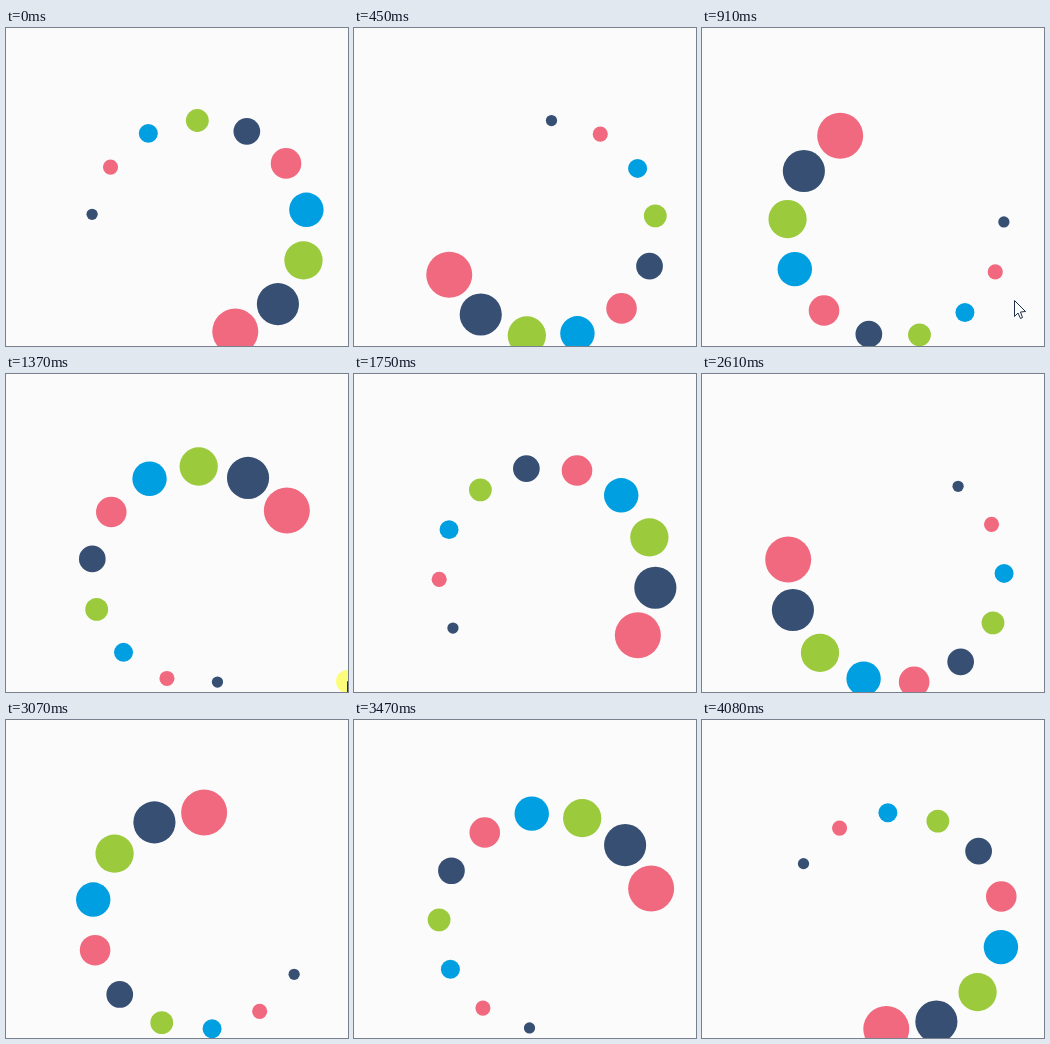
Recreate the animation shown at these times as an HTML page with a canvas. Size 342 px wide and 318 px high, loop 4.16 s.

```html
<!DOCTYPE html>
<html lang="en">
<head>
<meta charset="utf-8">
<title>Spinner</title>
<style>
  html, body { margin: 0; width: 100%; height: 100%; overflow: hidden; background: #fbfbfb; }
  canvas { display: block; width: 342px; height: 318px; }
</style>
</head>
<body>
<canvas id="stage" width="342" height="318"></canvas>
<script>
const ctx = document.getElementById('stage').getContext('2d');
const W = 342, H = 318, LOOP = 4160;
const CENTER = { x: 193.6, y: 201 }, ORBIT = 108.5;
const COLORS = ['#f1697f', '#364f72', '#9bca3c', '#009fe1'];
const DOTS = 10, GAP = 27, START = 70.8, TURN = 14.04;

// The spinner ticks at an even beat, with one short stall late in the loop.
const FIRST = 69, BEAT = 76.4, LAST_STEP = 53;
const STALL = { at: 3278, length: 38 };

function stepAt(ms) {
  const t = ms < STALL.at ? ms : Math.max(STALL.at - 1, ms - STALL.length);
  return Math.min(LAST_STEP, Math.floor((t - FIRST) / BEAT) + 1);
}

function disc(x, y, r, color) {
  ctx.fillStyle = color;
  ctx.beginPath();
  ctx.arc(x, y, r, 0, Math.PI * 2);
  ctx.fill();
}

function drawDots(step) {
  const head = START + TURN * step;
  for (let i = DOTS - 1; i >= 0; i--) {
    const a = (head - GAP * i) * Math.PI / 180;
    disc(CENTER.x + ORBIT * Math.cos(a), CENTER.y + ORBIT * Math.sin(a),
         23 - 1.93 * i, COLORS[i % COLORS.length]);
  }
}

// The pointer rests, slides to the edge, then shows a click highlight.
function drawPointer(step) {
  if (step < 12 || step > 21) return;
  const k = Math.min(1, Math.max(0, (step - 14) / 3));
  const x = Math.round(312 + 29 * k) + 0.5;
  const y = Math.round(272 + 35 * k) + 0.5;
  if (k === 1) disc(x, y, 11.5, '#fdfd7c');
  const arrow = [[0, 0], [0, 16], [3.5, 12.5], [6, 18], [8, 17], [6, 11.5], [11, 11]];
  ctx.beginPath();
  arrow.forEach(([dx, dy]) => ctx.lineTo(x + dx, y + dy));
  ctx.closePath();
  ctx.fillStyle = '#fff';
  ctx.fill();
  ctx.lineWidth = 1;
  ctx.strokeStyle = '#1f2f4a';
  ctx.stroke();
}

function draw(ms) {
  const step = stepAt(ms % LOOP);
  ctx.fillStyle = '#fbfbfb';
  ctx.fillRect(0, 0, W, H);
  drawDots(step);
  drawPointer(step);
}

const begin = performance.now();
function tick() {
  draw(Math.max(0, performance.now() - begin));
  requestAnimationFrame(tick);
}
tick();
</script>
</body>
</html>
```
